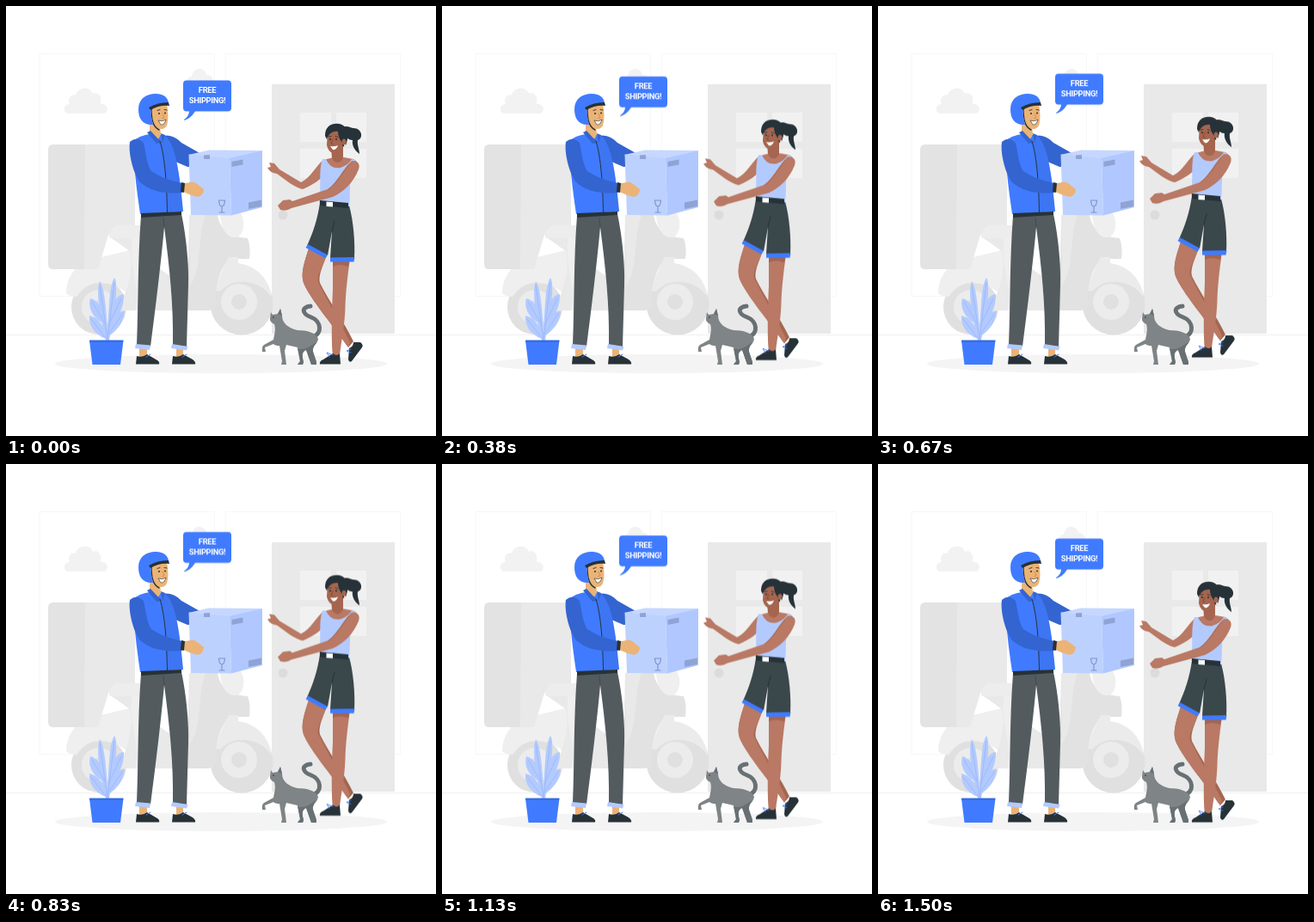
Animation, 500 px wide and 500 px high, one loop 1540 ms. Source, as an HTML page:

```html
<!DOCTYPE html>
<html lang="en">
<head>
<meta charset="utf-8">
<title>Free shipping</title>
<style>
  html, body { margin: 0; width: 100%; height: 100%; overflow: hidden; background: #fff; }
  svg { display: block; width: 100vw; height: 100vh; }
  .float { animation: float 770ms cubic-bezier(.37, 0, .63, 1) -50ms infinite alternate; }
  @keyframes float {
    from { transform: translateY(.1px); }
    to { transform: translateY(-8px); }
  }
  text { font: 700 9.4px Roboto, sans-serif; letter-spacing: -.35px; fill: #fff; text-anchor: middle; }
  .line { fill: none; stroke-linecap: round; stroke-linejoin: round; }
  .blue { fill: #407bff; }
  .navy { fill: #3464d0; }
  .pale { fill: #b3caff; }
  .dark { fill: #263238; }
  .peach { fill: #ebb376; }
  .skin { fill: #b97964; }
  .shade { fill: #a5654f; }
  .cat { fill: #7f8486; }
</style>
</head>
<body>
<svg viewBox="0 0 500 500">
  <g id="room">
    <path class="line" stroke="#f7f7f7" d="M39.500 55.500H242.500V337.500H39.500ZM255.500 55.500H458.500V337.500H255.500Z"/>
    <path class="line" stroke="#f0f0f0" d="M0 382.500H500"/>
    <g fill="#f2f2f2">
      <path d="M73 125C66 125 66 114 74 114C71 107 76 102 81 104C83 94 98 93 101 102C108 99 112 107 110 114C120 113 120 125 113 125Z"/>
      <path d="M213 95C208 88 211 81 216 82C217 71 231 70 233 80C239 79 243 86 241 95Z"/>
    </g>
    <path fill="#e9e9e9" d="M309 91H452V381H309Z"/>
    <path fill="#f1f1f1" d="M342 124H378V158H342ZM384 124H419V158H384ZM342 166H378V200H342ZM384 166H419V200H384Z"/>
    <circle cx="322" cy="243" r="5.500" fill="#dcdcdc"/>
    <ellipse cx="250" cy="416" rx="193" ry="11" fill="#f4f4f4"/>
  </g>

  <g id="scooter">
    <circle cx="108" cy="350" r="32" fill="#e0e0e0"/>
    <circle cx="108" cy="350" r="20" fill="#ececec"/>
    <circle cx="108" cy="350" r="8" fill="#e0e0e0"/>
    <circle cx="274" cy="346" r="36.500" fill="#e0e0e0"/>
    <circle cx="271" cy="344" r="21" fill="#ececec"/>
    <circle cx="271" cy="344" r="9" fill="#e0e0e0"/>
    <path fill="#efefef" d="M70 334C70 318 78 304 94 296L152 282V345C140 330 126 322 109 322C92 322 86 334 82 338Q74 338 70 334Z"/>
    <path fill="#e9e9e9" d="M120 268H156C166 290 176 318 222 322L244 329V346Q242 354 234 354H128C145 330 148 300 144 285Z"/>
    <path fill="#efefef" d="M147 269H158V354H150C158 330 141 300 147 269Z"/>
    <path fill="#e2e2e2" d="M213 243H246C249 258 256 268 281 270Q285 280 283 294L259 294C250 306 244 318 244 346Q242 354 234 354H211Z"/>
    <path fill="#e9e9e9" d="M213 243H232C222 270 229 302 214 326Z"/>
    <path fill="#efefef" d="M249 243L272 239C279 251 277 264 269 269C256 271 250 258 249 243Z"/>
    <path fill="#ebebeb" d="M259 292H270L270 299C290 302 306 316 309 339Q298 323 280 321C263 319 255 326 249 332L244 331C246 318 252 304 259 292Z"/>
    <path fill="#ededed" d="M123 255H158V270H121Q116 260 123 255Z"/>
    <path fill="#e9e9e9" d="M86 161H150V255H128Q120 260 117 273L107 306H86Z"/>
    <path fill="#e3e3e3" d="M55 161H92L91 306H55Q49 306 49 300V167Q49 161 55 161Z"/>
  </g>

  <g id="plant">
    <g class="pale">
      <path d="M116 389C110 363 104 333 109 320C115 327 117 360 119 389Z"/>
      <path d="M117 389C120 362 119 326 126 316C132 324 125 362 120 389Z"/>
      <path d="M119 374C120 347 130 335 137 335C138 350 129 365 119 374Z"/>
      <path d="M115 370C100 363 95 350 98 340C108 342 114 355 115 370Z"/>
      <path d="M119 384C121 364 130 354 138 355C138 366 129 378 119 384Z"/>
      <path d="M116 387C103 382 96 372 97 360C108 362 115 373 116 387Z"/>
    </g>
    <path class="line" stroke="#97b6fc" stroke-width=".8" d="M109 325L118 388L126 322M119 372L134 340M115 369L100 344M119 382L135 358M116 386L99 364"/>
    <path class="blue" d="M97 389H136.500L133 417H100.500Z"/>
    <path fill="#386ce0" d="M97 388.500H136.500L136 391H97.500Z"/>
  </g>

  <g id="courier">
    <path class="peach" d="M155 397H164V408H155ZM198 397H206V408H198Z"/>
    <path class="dark" d="M152 407Q159 409 164 405L176 412Q179 414 178 416.500H151ZM194 407Q201 409 206 405L217 411Q221 414 220 416.500H193Z"/>
    <path class="line" stroke="#407bff" d="M163 408L168 405M205 408L210 405"/>
    <path fill="#535b5f" d="M157 244L204 242C210 270 213 304 212 325L210 396L194 394C195 348 190 303 184 257C180 300 174 350 168 396L152 394C154 345 153 296 157 244Z"/>
    <path class="line" stroke="#414b50" d="M184 257L183 246"/>
    <path class="pale" d="M151 393L168 394.500L167 400L150 398ZM193 393L211.500 396L210 400.500L192 398Z"/>
    <path class="navy" d="M180 151C192 149 198 153 204 159L227 172L224 186L211 187L190 178Z"/>
    <path class="blue" d="M162 150Q174 147 185 151C194 158 201 178 206 239L156 242C153 221 150 200 149 180L146 163Q148 153 162 150Z"/>
    <path class="navy" d="M182 151L190 153C198 169 203 210 206 239L188 241C188 211 185 178 180 158Z" opacity=".25"/>
    <path class="peach" d="M167 136L179 139L180 149Q178 156 174 155Q168 151 167 145Z"/>
    <path class="navy" d="M164 147L168 145L181 159L175 160ZM180 148L185 150L182 159Z"/>
    <path class="line" stroke="#263238" d="M179 157C185 176 187 209 187.500 241"/>
    <path class="dark" d="M157 241L204 239V243L157 246Z"/>
    <path class="peach" d="M169 117L187 114Q190 129 187 139Q183 146 175 141Q169 136 169 117Z"/>
    <path class="line" stroke="#263238" stroke-width="1.400" d="M169 118C169 130 170 140 178 144"/>
    <path class="blue" d="M171 138C158 139 154 130 154 120C154 108 163 102 174 102C184 102 189 107 189 114L169 118C168 126 170 132 171 138Z"/>
    <path class="dark" d="M166 118Q176 112 189 112L190 116Q178 115 168 121Z"/>
    <circle class="dark" cx="178" cy="125" r="1"/>
    <circle class="dark" cx="185" cy="124.500" r="1"/>
    <path class="line" stroke="#263238" stroke-width=".9" d="M176 121.500L179 120.500M184 120.500L187 121"/>
    <path class="line" stroke="#c98b50" stroke-width=".8" d="M182 125L184 130L181.500 130.500"/>
    <path fill="#fff" stroke="#263238" stroke-width=".6" d="M177 133Q182 135 186 132Q184 139 180 138Z"/>
  </g>

  <g id="parcel">
    <path fill="#c6d7ff" d="M212.500 173L236 167.500L298 168L260 178Z"/>
    <path fill="#bdd1ff" d="M212.500 172.500L260 177L262 243.500L215 243Z"/>
    <path fill="#b0c8ff" d="M260 177L298 168V234L262 243.500Z"/>
    <path fill="#8fa3d4" d="M230 173.500L237 173V178H230ZM262.500 181L275.500 178.500V184.500L262.500 187ZM282 228.500L297 225.500V233L282 236Z"/>
    <path class="line" stroke="#7d94cb" stroke-width="1.200" d="M247.500 226H254.500Q254 233 251 233Q248 233 247.500 226ZM251 233V239.500M248 240H254"/>
  </g>

  <g id="arm">
    <path class="navy" d="M144 158Q152 151 160 159C163 173 164 185 169 192C181 200 194 204 206 206L205 217C187 219 168 216 156 205C148 195 142 171 144 158Z"/>
    <path class="peach" d="M206 206C213 206 216 203 221 206L230 213Q230 220 223 222Q214 220 206 216Z"/>
    <path class="dark" d="M204 205L208 206L207 217L203 216Z"/>
  </g>

  <g id="cat">
    <path class="line" stroke="#687074" stroke-width="5" d="M356 385C369 381 366 366 355 362C344 358 343 350 354 349"/>
    <path class="cat" d="M308 356L310 359L316 358L319 352L321 360C321 369 329 375 339 377C350 377 361 380 363 387C362 394 356 395 357 402L361 414V417H355L349 400C344 402 344 406 346 414L345 417H339L342 413L339 397L326 394L324 401L326 417H320L321 413L318 395Q313 395 311 393L301 397L302 402H298Q297 396 300 394L311 388C312 382 314 376 312 370Q306 367 307 363Z"/>
    <path fill="#687074" d="M339 398C347 402 355 394 361 391Q356 396 357 402L361 414V417H355L349 400C344 402 344 406 346 414L345 417H339L342 413ZM316 358L319 352L321 360Z"/>
    <circle class="dark" cx="311" cy="362" r=".8"/>
  </g>

  <g id="customer" class="float">
    <path class="dark" d="M390 143C394 137 401 142 404 142C414 142 416 154 409 156C408 161 411 167 411 172C405 168 402 161 403 156C398 156 394 151 390 149Z"/>
    <path class="shade" d="M352 282L372 292C367 306 363 314 365 322C376 344 394 369 404 390L398 397C384 376 353 340 346 322C342 310 348 295 352 282Z"/>
    <path class="skin" d="M352 282L372 292C367 306 361 314 363 321C376 347 389 368 400 391L398 397C384 376 353 340 346 322C342 310 348 295 352 282Z"/>
    <path class="skin" d="M380 294H400C397 315 395 333 394.500 350C394 370 390 390 388 406H380C378 389 379 350 380 330Z"/>
    <path class="shade" d="M380 297H399L398 303Q388 299 380 303Z"/>
    <path class="dark" d="M380 404Q385 408 388 404L389 416.500H365Q364 413 369 411ZM399 398Q404 396 404 391L412 391Q416 394 414 397L402 413Q399 415 398 411Z"/>
    <path class="line" stroke="#407bff" stroke-width=".9" d="M380 406L373 403L376 408M401 399L396 401L401 403"/>
    <path class="skin" d="M370 178C360 186 355 199 343 205L318 190L312 183L306 182L308 187L304 188Q307 194 315 195C325 202 335 211 345 213C354 209 365 203 370 196Z"/>
    <path fill="#3a474b" d="M365 229L399 232C404 250 406 275 405 293H377L379 262L374 290L350 279C357 263 362 249 365 229Z"/>
    <path class="line" stroke="#263238" d="M379 262L382 250"/>
    <path class="blue" d="M351 277L374 289.500L371.500 293.500L348.500 281ZM377 292.500L405.500 292L404.500 297.500H377Z"/>
    <path class="skin" d="M369 179L381 176H393L404 178Q412 182 409 191L397 207L370 198Z"/>
    <path class="pale" d="M368 178L372 178Q377 190 389 188Q398 185 402 178L406 179C398 195 401 214 399 233L364 229C367 210 363 192 368 178Z"/>
    <path class="dark" d="M365 226L398 229V235L365 232Z"/>
    <path fill="#fff" d="M372.500 227.500L380 228V233.500L372.500 233Z"/>
    <path class="shade" d="M378 164L392 161L392 176Q390 182 385 182Q380 181 379 176Z"/>
    <path class="shade" d="M374 146Q382 140 391 146L394 156Q392 170 383 172Q375 171 373 162Z"/>
    <path class="dark" d="M371 151C371 141 377 136 387 137C397 138 400 151 395 162Q391 166 391 159Q386 153 386 146C381 145 375 148 373 155Z"/>
    <ellipse class="shade" cx="393" cy="158" rx="2.500" ry="3.500"/>
    <circle cx="394" cy="162" r="1" fill="#fff"/>
    <circle class="dark" cx="377" cy="155" r="1"/>
    <circle class="dark" cx="384" cy="155" r="1"/>
    <path class="line" stroke="#263238" stroke-width=".8" d="M375 152L378 151.500M383 151.500L386 152.500"/>
    <path class="line" stroke="#82442f" stroke-width=".8" d="M380 155L378 160L380 160.500"/>
    <path fill="#fff" d="M377 163Q382 164 386 162Q384 168 380 167Z"/>
    <path class="skin" d="M402 180Q413 180 410 190C404 205 393 216 380 222L332 235Q326 239 319 237L316 232L322 226L330 225L333 227L374 213C385 206 391 190 402 180Z"/>
    <path class="line" stroke="#a5654f" stroke-width=".8" d="M375 213C385 206 391 194 399 184"/>
  </g>

  <g id="bubble" class="float">
    <path class="blue" d="M210 86.500H258Q262 86.500 262 90.500V118.500Q262 122.500 258 122.500H220Q214 132 206 133Q213 128 213 122.500H210Q206 122.500 206 118.500V90.500Q206 86.500 210 86.500Z"/>
    <text x="234" y="101.500">FREE</text>
    <text x="234" y="113.500">SHIPPING!</text>
  </g>
</svg>
</body>
</html>
```
